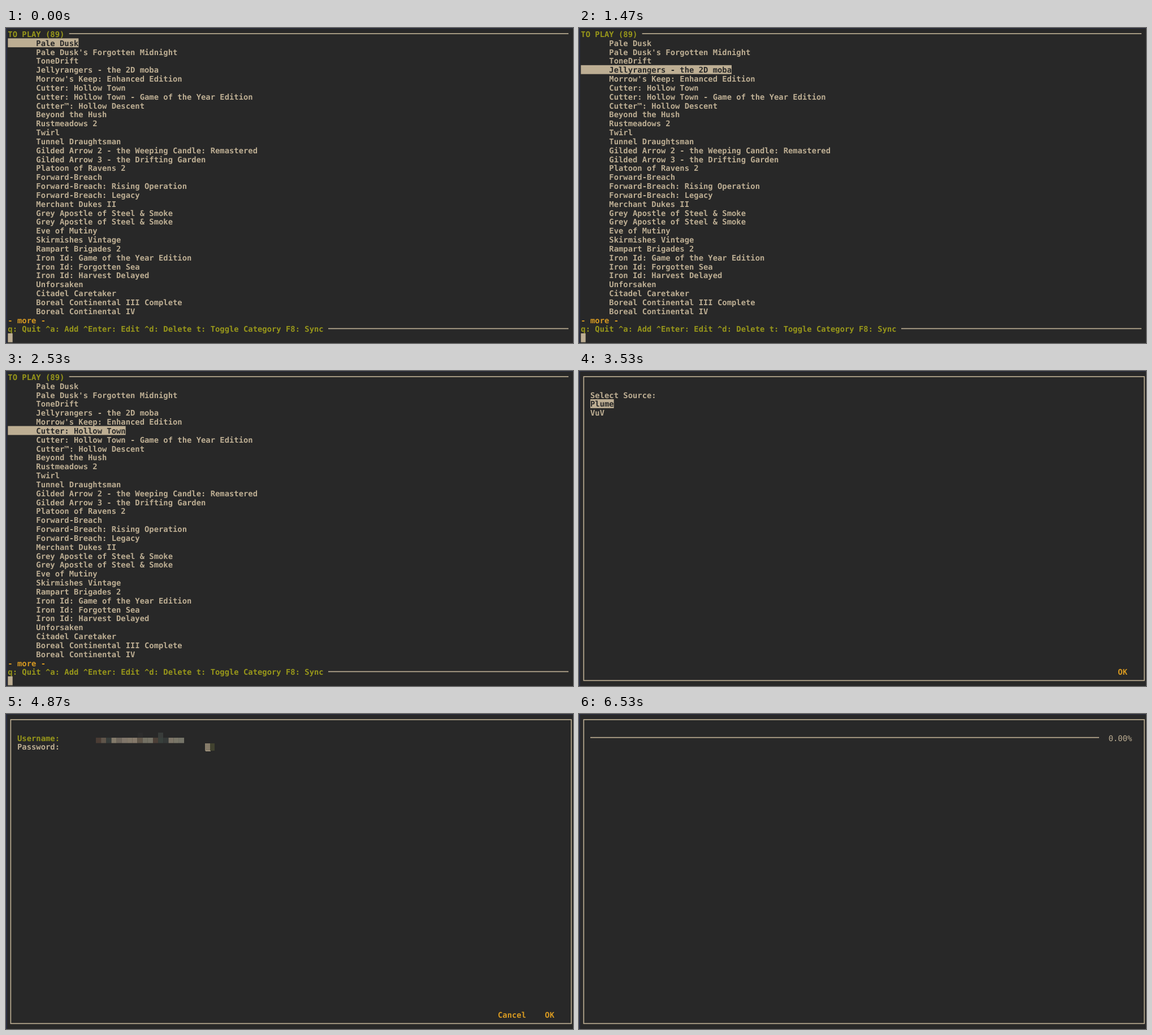
Animation of 1003 by 558 pixels, one loop 8 s. Source, as an HTML page:

```html
<!DOCTYPE html>
<html lang="en">
<head>
<meta charset="utf-8">
<title>Game list</title>
<style>
html, body { margin: 0; width: 100%; height: 100%; overflow: hidden; background: #282828; }
svg {
  display: block; width: 1003px; height: 558px;
  font: bold 16.61px "DejaVu Sans Mono", monospace;
  text-rendering: geometricPrecision;
}
</style>
</head>
<body>
<svg id="stage" viewBox="0 0 1203.6 669.6"></svg>
<script>
// Terminal grid; one stage pixel is SCALE units
const CELL = 10, LINE = 19, LEFT = 4, TOP = 3, BASE = 16, SCALE = 1.2, LOOP = 8000;
const BACK = "#282828", SAND = "#bdae93", GREEN = "#98971a", GOLD = "#d79921", NAVY = "#2a2e42";

const games = `Pale Dusk
Pale Dusk's Forgotten Midnight
ToneDrift
Jellyrangers - the 2D moba
Morrow's Keep: Enhanced Edition
Cutter: Hollow Town
Cutter: Hollow Town - Game of the Year Edition
Cutter™: Hollow Descent
Beyond the Hush
Rustmeadows 2
Twirl
Tunnel Draughtsman
Gilded Arrow 2 - the Weeping Candle: Remastered
Gilded Arrow 3 - the Drifting Garden
Platoon of Ravens 2
Forward-Breach
Forward-Breach: Rising Operation
Forward-Breach: Legacy
Merchant Dukes II
Grey Apostle of Steel & Smoke
Grey Apostle of Steel & Smoke
Eve of Mutiny
Skirmishes Vintage
Rampart Brigades 2
Iron Id: Game of the Year Edition
Iron Id: Forgotten Sea
Iron Id: Harvest Delayed
Unforsaken
Citadel Caretaker
Boreal Continental III Complete
Boreal Continental IV`.split("\n");

const x = col => LEFT + col * CELL;
const y = row => TOP + row * LINE;

const rect = (left, top, w, h, color) =>
  `<rect x="${left}" y="${top}" width="${w}" height="${h}" fill="${color}"/>`;

const text = (col, row, str, color = SAND, weight = "bold") =>
  `<text x="${x(col)}" y="${y(row) + BASE}" fill="${color}" font-weight="${weight}">${str}</text>`;

const fillCells = (col, row, count, color) => rect(x(col), y(row), count * CELL, LINE, color);

const rule = (from, to, row) => rect(x(from), y(row) + 8, x(to) - x(from), 2, SAND);

// Text with `pad` blank cells before it, inverted when active
const item = (col, row, str, active, pad = 0) => active
  ? fillCells(col, row, pad + str.length, SAND) + text(col + pad, row, str, BACK)
  : text(col + pad, row, str);

const button = (col, label, active) =>
  (active ? fillCells(col, 33, label.length + 2, GOLD) : "") +
  text(col + 1, 33, label, active ? BACK : GOLD);

const list = selected =>
  text(0, 0, "TO PLAY (89)", GREEN) + rule(13, 119, 0) +
  games.map((name, i) => item(0, i + 1, name, i === selected, 6)).join("") +
  text(0, 32, "- more -", GOLD) +
  text(0, 33, "q: Quit ^a: Add ^Enter: Edit ^d: Delete t: Toggle Category F8: Sync", GREEN) +
  rule(68, 119, 33) + fillCells(0, 34, 1, SAND);

const form = content =>
  `<rect x="10" y="12" width="1190" height="646" fill="none" stroke="${SAND}" stroke-width="2"/>` + content;

const picker = selected => form(
  text(2, 2, "Select Source:") +
  ["Plume", "VuV"].map((name, i) => item(2, 3 + i, name, i === selected)).join("") +
  button(113, "OK"));

const inPixels = content => `<g transform="scale(${SCALE})">${content}</g>`;

// Pixelated user name
const mosaic = inPixels(
  "4a3c34 5f554a 363c3a 837a6a 6f675d 80766a 83796a 85796a 61574a 737063 757265 4b3f37 38403c 343837 7d7567 797668 757468"
    .split(" ").map((c, i) => rect(159 + i * 9.18, 42, 9.18, 9.5, "#" + c)).join("") +
  rect(233, 33, 9, 9, "#2c2c2c") + rect(269, 33, 9, 9, "#393c3a"));

const nameCursor = inPixels(rect(315, 42, 9, 9.5, "#857b69"));
const passwordCursor = inPixels(
  rect(352, 52, 9, 13, "#857b69") + rect(353, 65, 9, 1, SAND) + rect(361, 52, 8, 13, "#41422f"));

// Focus order: user name, password, Cancel, OK
const login = focus => form(
  text(2, 2, "Username:", focus === 0 ? SAND : GREEN) + mosaic +
  text(2, 3, "Password:", focus === 1 ? SAND : GREEN) +
  (["", nameCursor, passwordCursor][focus + 1] || "") +
  button(103, "Cancel", focus === 2) + button(113, "OK", focus === 3));

const progress = () => form(rule(2, 110, 2) + text(112, 2, "0.00%", SAND, "normal"));

const scenes = [
  [0, list, 0], [1130, list, 1], [1330, list, 2], [1470, list, 3], [2130, list, 4], [2530, list, 5],
  [3530, picker, 0], [3870, picker, 1],
  [4530, login, 0], [4870, login, 1], [5530, login, 2], [5670, login, 3],
  [6530, progress]
];

const edges = inPixels(rect(0, 0, 2, 558, NAVY) + rect(0, 0, 1003, 1, NAVY));
const stage = document.getElementById("stage");
let shown;

function draw() {
  const t = performance.now() % LOOP;
  const scene = scenes.findLast(([start]) => start <= t);
  if (scene !== shown) {
    shown = scene;
    const [, view, state] = scene;
    stage.innerHTML = edges + view(state);
  }
  requestAnimationFrame(draw);
}
draw();
</script>
</body>
</html>
```
